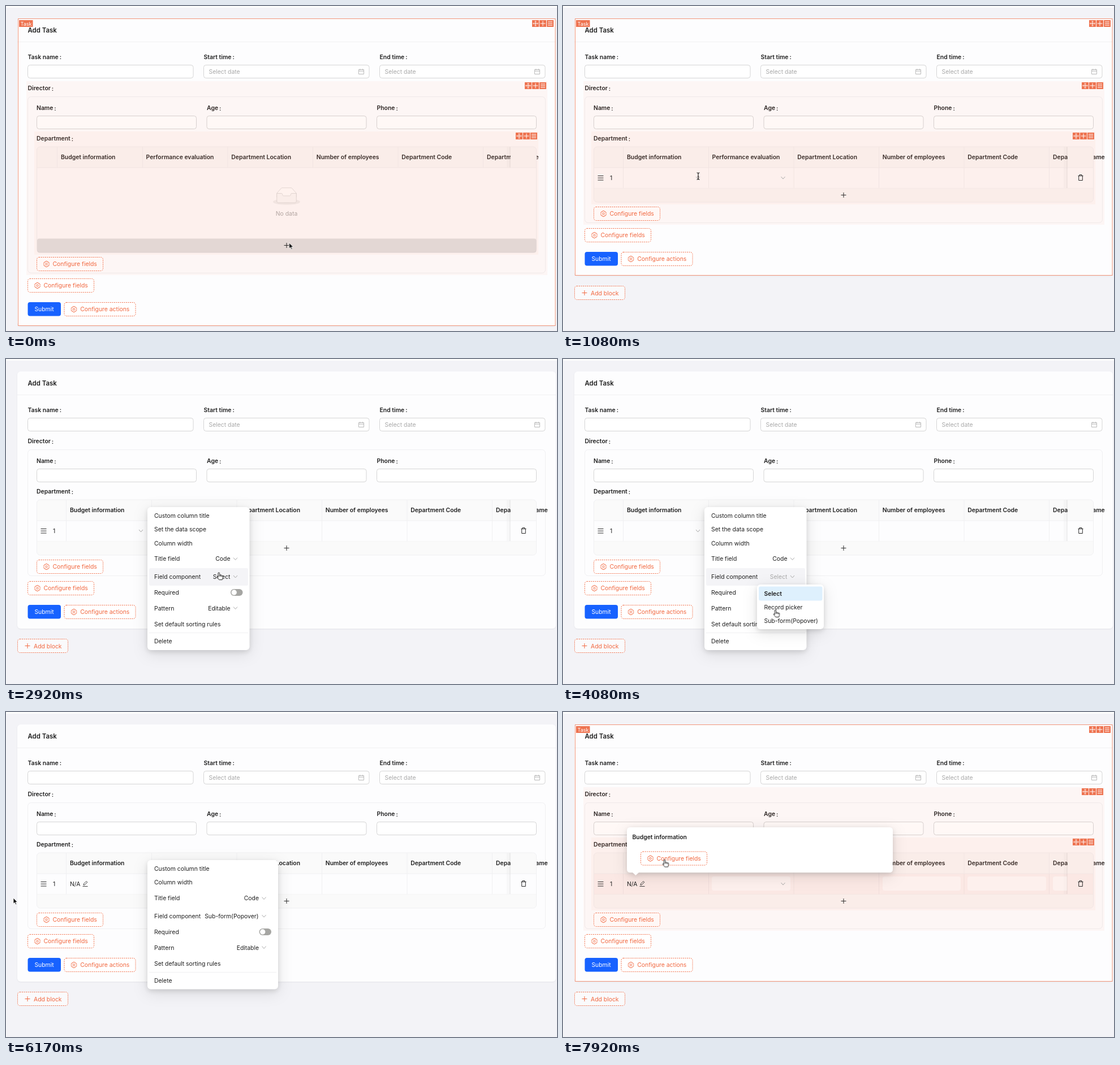
An HTML page that plays this animation: 974 by 575 pixels, repeating every 8000 ms.

```html
<!DOCTYPE html>
<html lang="en">
<head>
<meta charset="utf-8">
<title>Add Task</title>
<style>
html, body { margin: 0; width: 100%; height: 100%; overflow: hidden; background: #fdfdfd; }
svg { display: block; width: 974px; height: 575px; }
text { font: 10.4px Inter, "Liberation Sans", sans-serif; fill: #1f1f1f; dominant-baseline: central; }
.b text, text.b { font-weight: 600; }
text.title { font-size: 11.4px; font-weight: 600; }
.soft { fill: #a9a9a9; }
.end { text-anchor: end; }
.mid { text-anchor: middle; }
.field { fill: #fff; stroke: #d5d5d5; }
.line { fill: none; stroke: #f0f0f2; }
.ink { fill: none; stroke: #2b2b2b; }
.dash { fill: #fff; stroke: #f2704a; stroke-dasharray: 2 1.5; }
.orange text { fill: #f1673f; }
.gear { fill: none; stroke: #f1673f; }
.chip { fill: #ee7350; }
.glyph { fill: none; stroke: #fff; }
.wash { fill: #f18b62; fill-opacity: .06; }
.panel { fill: #fff; filter: drop-shadow(0 3px 5px rgba(0,0,0,.12)) drop-shadow(0 6px 13px rgba(0,0,0,.11)); }
.hover { fill: #f4f4f7; }

/* One 8 s loop: 1% = 80 ms */
.loop { animation: 8s step-end infinite; }
.tall { animation-name: tall; }
.drop { animation-name: drop; }
.cols { animation-name: cols; }
.empty { animation-name: empty; }
.row { animation-name: row; }
.press { animation-name: press; }
.block { animation-name: block; }
.nested { animation-name: nested; }
.column { animation-name: column; }
.menu { animation-name: menu; }
.menu2 { animation-name: menu2; }
.hit1 { animation-name: hit1; }
.hit2 { animation-name: hit2; }
.hit3 { animation-name: hit3; }
.hit4 { animation-name: hit4; }
.value { animation-name: value; }
.list { animation-name: list; transform-origin: 402px 399px; }
.select { animation-name: select; }
.pencil { animation-name: pencil; }
.na { animation-name: na; }
.rowhover { animation-name: rowhover; }
.pop { animation-name: pop; transform-origin: 128px 289px; }
.cursor { animation-name: cursor; }
.arrow { animation-name: arrow; }
.beam { animation-name: beam; }
.hand { animation-name: hand; }

@keyframes tall { 0% { height: calc(var(--h) + 89px); } 10.375%, 100% { height: var(--h); } }
@keyframes drop { 0% { transform: translateY(89px); } 10.375%, 100% { transform: none; } }
@keyframes cols { 0% { transform: translateX(-16px); } 10.375%, 100% { transform: none; } }
@keyframes empty { 0% { opacity: 1; } 10.375%, 100% { opacity: 0; } }
@keyframes row { 0% { opacity: 0; } 10.375%, 100% { opacity: 1; } }
@keyframes press {
  0% { fill-opacity: .09; }
  3% { fill-opacity: .09; animation-timing-function: steps(3); }
  5.25% { fill-opacity: .05; }
  10.375%, 100% { fill-opacity: 0; }
}
@keyframes block {
  0%, 78.1% { opacity: 1; } 29.2%, 75% { opacity: 0; }
  71.9% { opacity: 1; } 100% { opacity: 1; }
}
@keyframes nested {
  0%, 12.5%, 71.9%, 78.1% { opacity: 1; }
  10.375%, 29.2%, 75% { opacity: 0; }
  100% { opacity: 1; }
}
@keyframes column { 0%, 29.2%, 100% { opacity: 0; } 16.6% { opacity: 1; } }
@keyframes menu {
  0% { opacity: 0; }
  25% { opacity: 0; animation-timing-function: linear; }
  27.1% { opacity: 1; }
  64.625%, 100% { opacity: 0; }
}
@keyframes menu2 {
  0% { opacity: 0; }
  64.625% { opacity: 1; }
  79.2% { opacity: 1; animation-timing-function: linear; }
  82.3%, 100% { opacity: 0; }
}
@keyframes hit1 { 0%, 34.375%, 100% { opacity: 0; } 31.25% { opacity: 1; } }
@keyframes hit2 { 0%, 64.625%, 100% { opacity: 0; } 34.375% { opacity: 1; } }
@keyframes hit3 { 0%, 53.1%, 100% { opacity: 0; } 52.1% { opacity: .6; } 53.1% { opacity: 1; } }
@keyframes hit4 { 0% { opacity: 1; } 69.7%, 100% { opacity: 0; } }
@keyframes value { 0% { fill: #1f1f1f; } 42.7%, 100% { fill: #a9a9a9; } }
@keyframes list {
  0% { opacity: 0; transform: scaleY(.8); }
  40.6% { opacity: 0; transform: scaleY(.8); animation-timing-function: ease-out; }
  44.2% { opacity: 1; transform: none; }
  64.625%, 100% { opacity: 0; transform: none; }
}
@keyframes select { 0% { opacity: 1; } 64.625%, 100% { opacity: 0; } }
@keyframes pencil { 0%, 65.7%, 100% { opacity: 0; } 64.625% { opacity: 1; } }
@keyframes na { 0% { opacity: 0; } 65.7%, 100% { opacity: 1; } }
@keyframes rowhover {
  0% { opacity: 0; }
  80.25% { opacity: 0; animation-timing-function: linear; }
  83.3%, 100% { opacity: 1; }
}
@keyframes pop {
  0% { opacity: 0; transform: scale(.8); }
  89.6% { opacity: 0; transform: scale(.8); animation-timing-function: steps(3); }
  92.75%, 100% { opacity: 1; transform: none; }
}
@keyframes cursor {
  0% { transform: translate(500.5px, 419px); }
  9.375% { transform: translate(500.5px, 419px); animation-timing-function: steps(4); }
  13.5% { transform: translate(239px, 301px); animation-timing-function: steps(3); }
  16.6% { transform: translate(228px, 274px); animation-timing-function: steps(6); }
  22.9% { transform: translate(255px, 254px); }
  26% { transform: translate(255px, 254px); animation-timing-function: steps(2); }
  28.125% { transform: translate(261.5px, 270.5px); animation-timing-function: steps(2); }
  30.25% { transform: translate(300px, 325px); animation-timing-function: steps(2); }
  32.25% { transform: translate(335px, 360px); }
  33.3% { transform: translate(335px, 360px); animation-timing-function: steps(4); }
  37.5% { transform: translate(390px, 384px); }
  46.875% { transform: translate(390px, 384px); animation-timing-function: steps(4); }
  51% { transform: translate(375.5px, 444px); animation-timing-function: steps(4); }
  55.25% { transform: translate(372px, 464.5px); }
  68.75% { transform: translate(372px, 464.5px); animation-timing-function: steps(8); }
  77.125% { transform: translate(13px, 329px); animation-timing-function: steps(2); }
  79.125% { transform: translate(70px, 314px); animation-timing-function: steps(5); }
  84.375% { transform: translate(138px, 300px); }
  99%, 100% { transform: translate(179.5px, 261.5px); }
}
@keyframes arrow {
  0%, 15.6%, 72.9% { opacity: 1; }
  12.5%, 20.8%, 83.3%, 100% { opacity: 0; }
}
@keyframes beam { 0%, 15.6%, 100% { opacity: 0; } 12.5% { opacity: 1; } }
@keyframes hand { 0%, 72.9% { opacity: 0; } 20.8%, 83.3%, 100% { opacity: 1; } }
</style>
</head>
<body>
<svg viewBox="0 0 974 575">
<defs>
  <path id="chev" d="M-3.5-2L0 2L3.5-2" fill="none" stroke="#a8a8a8"/>
  <g id="gear" class="gear">
    <path d="M-1.4-5H1.4L2-3.3L3.6-3.6L5-1.2L4 0L5 1.2L3.6 3.6L2 3.3L1.4 5H-1.4L-2 3.3L-3.6 3.6L-5 1.2L-4 0L-5-1.2L-3.6-3.6L-2-3.3Z" stroke-width=".9"/>
    <circle r="1.7" stroke-width=".9"/>
  </g>
  <g id="cal" fill="none" stroke="#b3b3b3" stroke-width=".9">
    <path d="M-4.5-3.5H4.5V4.5H-4.5ZM-4.5-.8H4.5M-2.2-5V-2.4M2.2-5V-2.4"/>
  </g>
  <path id="plus" d="M-4.5 0H4.5M0-4.5V4.5"/>
  <g id="drag">
    <rect class="chip" x="-6" y="-6" width="12" height="12"/>
    <path class="glyph" d="M-4.2 0H4.2M0-4.2V4.2"/>
    <path class="glyph" stroke-width=".8" d="M-1.3-3.2L0-4.5L1.3-3.2M-1.3 3.2L0 4.5L1.3 3.2M-3.2-1.3L-4.5 0L-3.2 1.3M3.2-1.3L4.5 0L3.2 1.3"/>
  </g>
  <g id="more">
    <rect class="chip" x="-6" y="-6" width="12" height="12"/>
    <path class="glyph" d="M-4-3H4M-4 0H4M-4 3H4"/>
  </g>
  <g id="tools">
    <use href="#drag"/>
    <rect class="chip" x="7" y="-6" width="12" height="12"/>
    <use href="#plus" x="13" class="glyph"/>
    <use href="#more" x="26"/>
  </g>
  <g id="pen" class="ink" stroke-width=".9"><path d="M-4.5 4.5H4.5M-3 2.2L-2.6 0L2-4.6L3.8-2.8L-.8 1.8Z"/></g>
  <g id="config" class="orange">
    <rect class="dash" x=".5" y=".5" width="117" height="24" rx="4"/>
    <use href="#gear" x="17.5" y="12.5"/>
    <text x="28.5" y="12.5">Configure fields</text>
  </g>
  <g id="labels">
    <text x="262" y="353.5">Title field</text>
    <text x="262" y="385.5">Field component</text>
    <text x="262" y="413.5">Required</text>
    <text x="262" y="441">Pattern</text>
    <text x="262" y="469">Set default sorting rules</text>
    <text x="262" y="499.5">Delete</text>
  </g>
  <g id="values">
    <text class="end" x="396.5" y="353.5">Code</text>
    <text class="end" x="396.5" y="441">Editable</text>
    <use href="#chev" x="405.5" y="353.5"/>
    <use href="#chev" x="405.5" y="385"/>
    <use href="#chev" x="405.5" y="440.5"/>
    <rect x="397" y="407" width="21.5" height="12" rx="6" fill="#a6a6a3"/>
    <circle cx="403.2" cy="413" r="4.7" fill="#fff"/>
  </g>
</defs>

<rect x="1" y="3" width="973" height="572" fill="#f3f3f7"/>

<!-- form -->
<rect class="loop tall" style="--h:455px" x="20" y="22" width="952" rx="6" fill="#fdfdfe" filter="drop-shadow(0 1px 1px rgba(0,0,0,.06))"/>
<path class="line" d="M20 63.5H972"/>
<text class="title" x="38.5" y="43">Add Task</text>
<g class="b">
  <text x="38.5" y="90">Task name<tspan dx="2">:</tspan></text>
  <text x="349.5" y="90">Start time<tspan dx="2">:</tspan></text>
  <text x="660.5" y="90">End time<tspan dx="2">:</tspan></text>
  <text x="38.5" y="145.5">Director<tspan dx="2">:</tspan></text>
  <text x="54" y="180.5">Name<tspan dx="2">:</tspan></text>
  <text x="355" y="180.5">Age<tspan dx="2">:</tspan></text>
  <text x="655.5" y="180.5">Phone<tspan dx="2">:</tspan></text>
  <text x="54" y="234.5">Department<tspan dx="2">:</tspan></text>
</g>
<g class="field">
  <rect x="38.5" y="104.5" width="292.5" height="23" rx="4"/>
  <rect x="349.5" y="104.5" width="292.5" height="23" rx="4"/>
  <rect x="660.5" y="104.5" width="292.5" height="23" rx="4"/>
  <rect x="54.5" y="194.5" width="282" height="23" rx="4"/>
  <rect x="355" y="194.5" width="282" height="23" rx="4"/>
  <rect x="655.5" y="194.5" width="282" height="23" rx="4"/>
</g>
<text class="soft" x="358.5" y="116.5">Select date</text>
<text class="soft" x="669.5" y="116.5">Select date</text>
<use href="#cal" x="628" y="116"/>
<use href="#cal" x="939" y="116"/>
<rect class="line loop tall" style="--h:223px" x="38.5" y="160.5" width="915" rx="6"/>

<!-- table -->
<path d="M54.5 286V255Q54.5 249 60.5 249H931Q937.5 249 937.5 255V286Z" fill="#fafafa"/>
<g class="loop cols b">
  <path class="line" d="M106.5 249V286M257.5 249V286M408 249V286M558.5 249V286M709 249V286M859.5 249V286"/>
  <text x="113" y="267.5">Budget information</text>
  <text x="263.5" y="267.5">Performance evaluation</text>
  <text x="414.3" y="267.5">Department Location</text>
  <text x="564.8" y="267.5">Number of employees</text>
  <text x="715.3" y="267.5">Department Code</text>
  <text x="866" y="267.5">Department Name</text>
</g>
<path d="M892 249.5H931Q937 249.5 937 255V286H892Z" fill="#fafafa"/>
<path d="M891 249V286" stroke="#000" stroke-opacity=".05" stroke-width="2"/>
<path d="M888 249V286" stroke="#000" stroke-opacity=".02" stroke-width="6"/>
<path class="line" d="M55 286H937"/>

<g class="loop empty">
  <g transform="translate(472 321) scale(.75)">
    <ellipse cx="32" cy="34" rx="32" ry="7" fill="#f0f0f0"/>
    <g stroke="#d4d4d4" fill="#fff" transform="translate(0 1)">
      <path d="M55 12.8L44.9 1.3C44.4.5 43.7 0 42.9 0H21.1C20.3 0 19.6.5 19.1 1.3L9 12.8V22H55Z"/>
      <path fill="#fafafa" d="M41.6 15.9C41.6 14.3 42.6 13 43.8 13H55V31.1C55 33.3 53.7 35 52 35H12C10.3 35 9 33.3 9 31.1V13H20.2C21.4 13 22.4 14.3 22.4 15.9C22.4 17.6 23.4 18.9 24.6 18.9H39.4C40.6 18.9 41.6 17.6 41.6 15.9Z"/>
    </g>
  </g>
  <text class="soft mid" x="496" y="367">No data</text>
</g>

<g class="loop row">
  <path class="line" d="M106.5 286V322M257.5 286V322M408 286V322M558.5 286V322M709 286V322M859.5 286V322M55 322.5H937"/>
  <path d="M891 286V322" stroke="#000" stroke-opacity=".05" stroke-width="2"/>
  <path d="M888 286V322" stroke="#000" stroke-opacity=".02" stroke-width="6"/>
</g>

<g class="loop drop">
  <path d="M55 322.5H937V341Q937 347 931 347H61Q55 347 55 341Z" fill="#fafafa"/>
  <use href="#config" x="54" y="355"/>
  <use href="#config" x="38" y="393"/>
  <rect x="38.5" y="435" width="58.5" height="24.5" rx="4" fill="#1762ff"/>
  <text class="mid" x="67.5" y="447.5" style="fill:#fff">Submit</text>
  <g class="orange">
    <rect class="dash" x="103" y="435.5" width="126" height="24" rx="4"/>
    <use href="#gear" x="120" y="447.5"/>
    <text x="131.2" y="447.5">Configure actions</text>
    <rect class="dash" x="20.5" y="495.5" width="89" height="24" rx="4" fill-opacity=".6"/>
    <use href="#plus" class="gear" x="38" y="507.5"/>
    <text x="49" y="508">Add block</text>
  </g>
</g>
<rect class="line loop tall" style="--h:98px" x="54.5" y="249" width="883" rx="6"/>

<!-- designer overlays -->
<g class="loop block">
  <rect class="loop tall" style="--h:454px" x="21.5" y="22.5" width="949.5" fill="none" stroke="#f2967b"/>
  <rect class="chip" x="23" y="25" width="24.5" height="12"/>
  <text x="25.5" y="31.3" style="fill:#fff;font-size:9px">Task</text>
  <use href="#tools" x="936" y="31"/>
</g>
<g class="loop nested">
  <rect class="wash loop tall" style="--h:254px" x="36" y="133" width="921"/>
  <rect class="wash loop tall" style="--h:129px" x="50" y="222" width="891"/>
  <use href="#tools" x="923" y="141"/>
  <use href="#tools" x="907" y="230"/>
</g>

<g class="loop rowhover">
  <rect x="55" y="286.5" width="882" height="36" fill="#e8a89c" fill-opacity=".1"/>
  <g fill="#fff" fill-opacity=".35">
    <rect x="263" y="291" width="139" height="25" rx="4"/>
    <rect x="565" y="291" width="138" height="25" rx="4"/>
    <rect x="715" y="291" width="139" height="25" rx="4"/>
    <path d="M891 291H870Q866 291 866 295V312Q866 316 870 316H891Z"/>
  </g>
</g>
<g class="loop row">
  <path class="ink" d="M61.5 300.5H71.5M61.5 304.2H71.5M61.5 308H71.5"/>
  <text x="83" y="304.5">1</text>
  <g class="loop select"><use href="#chev" x="238.5" y="304"/></g>
  <use href="#chev" x="389" y="304"/>
  <path class="ink" d="M910.5 300.5H919.5M911.7 300.5V308.5H918.3V300.5M913 300V298.5H917V300"/>
</g>
<use href="#pen" class="loop pencil" x="122" y="298"/>
<g class="loop na">
  <text x="113" y="304.5">N/A</text>
  <use href="#pen" x="140" y="304"/>
</g>
<g class="loop drop">
  <use href="#plus" class="ink" x="496" y="334.5"/>
  <rect class="loop press" x="55" y="322.5" width="882.5" height="25" rx="4"/>
</g>
<g class="loop column">
  <rect class="wash" x="107" y="249" width="150" height="73.5" fill-opacity=".04"/>
  <use href="#drag" x="242" y="254.5"/>
  <use href="#more" x="255" y="254.5"/>
</g>

<!-- column menu -->
<g class="loop menu">
  <rect class="panel" x="250" y="262" width="180.5" height="253" rx="6"/>
  <rect class="hover loop hit1" x="253" y="338" width="175" height="31" rx="3"/>
  <rect class="hover loop hit2" x="253" y="370" width="175" height="31" rx="3"/>
  <text x="262" y="277.5">Custom column title</text>
  <text x="262" y="301.5">Set the data scope</text>
  <text x="262" y="326">Column width</text>
  <use href="#labels"/>
  <use href="#values"/>
  <text class="end loop value" x="396.5" y="385.5">Select</text>
  <path class="line" d="M253 484.5H428"/>
</g>
<g class="loop list">
  <rect class="panel" x="343" y="399" width="118" height="79" rx="6"/>
  <rect x="346" y="402.5" width="112.5" height="25" rx="3" fill="#def0fd"/>
  <rect class="hover loop hit3" x="346" y="451.5" width="112.5" height="24" rx="3"/>
  <text class="b" x="355.5" y="415.5">Select</text>
  <text x="355.5" y="439.5">Record picker</text>
  <text x="355.5" y="463.5">Sub-form(Popover)</text>
</g>
<g class="loop menu2">
  <rect class="panel" x="250" y="262" width="231" height="228.5" rx="6"/>
  <rect class="hover loop hit4" x="253" y="345.5" width="225" height="31" rx="3"/>
  <text x="262" y="277.5">Custom column title</text>
  <text x="262" y="301.5">Column width</text>
  <use href="#labels" y="-24"/>
  <use href="#values" x="50.5" y="-24"/>
  <text class="end" x="446.5" y="361.5">Sub-form(Popover)</text>
  <path class="line" d="M253 460.5H478"/>
</g>

<!-- popover -->
<g class="loop pop">
  <path class="panel" d="M119 204H577Q583 204 583 210V278Q583 284 577 284H134L128.5 289L123 284H119Q113 284 113 278V210Q113 204 119 204Z"/>
  <text class="b" x="122.5" y="221.5">Budget information</text>
  <use href="#config" x="137" y="246.5"/>
</g>

<!-- pointer -->
<g class="loop cursor">
  <path class="loop arrow" d="M0 0V10.2L2.3 8L4 11.8L5.6 11.1L4 7.4H7.2Z" fill="#111" stroke="#fff" stroke-width=".8"/>
  <path class="loop beam" d="M-2.5-6Q0-6 0-4.5Q0-6 2.5-6M0-4.5V4.5M-2.5 6Q0 6 0 4.5Q0 6 2.5 6M-1.2 1H1.2" fill="none" stroke="#111" stroke-width="1.1"/>
  <path class="loop hand" d="M-1.2 7V1Q-1.2-.2 0-.2Q1.2-.2 1.2 1V4.6Q2.4 3.6 3.3 4.9Q4.6 4 5.4 5.4Q7.2 4.8 7.2 6.8Q7.2 9.6 6 12.6H.4Q-1.2 10.4-3.2 8Q-3.4 6.2-1.2 7V8.6M1.2 4.6V7M3.3 4.9V7.2M5.4 5.4V7.4" fill="#fff" stroke="#111" stroke-width=".9" stroke-linejoin="round"/>
</g>
</svg>
</body>
</html>
```
